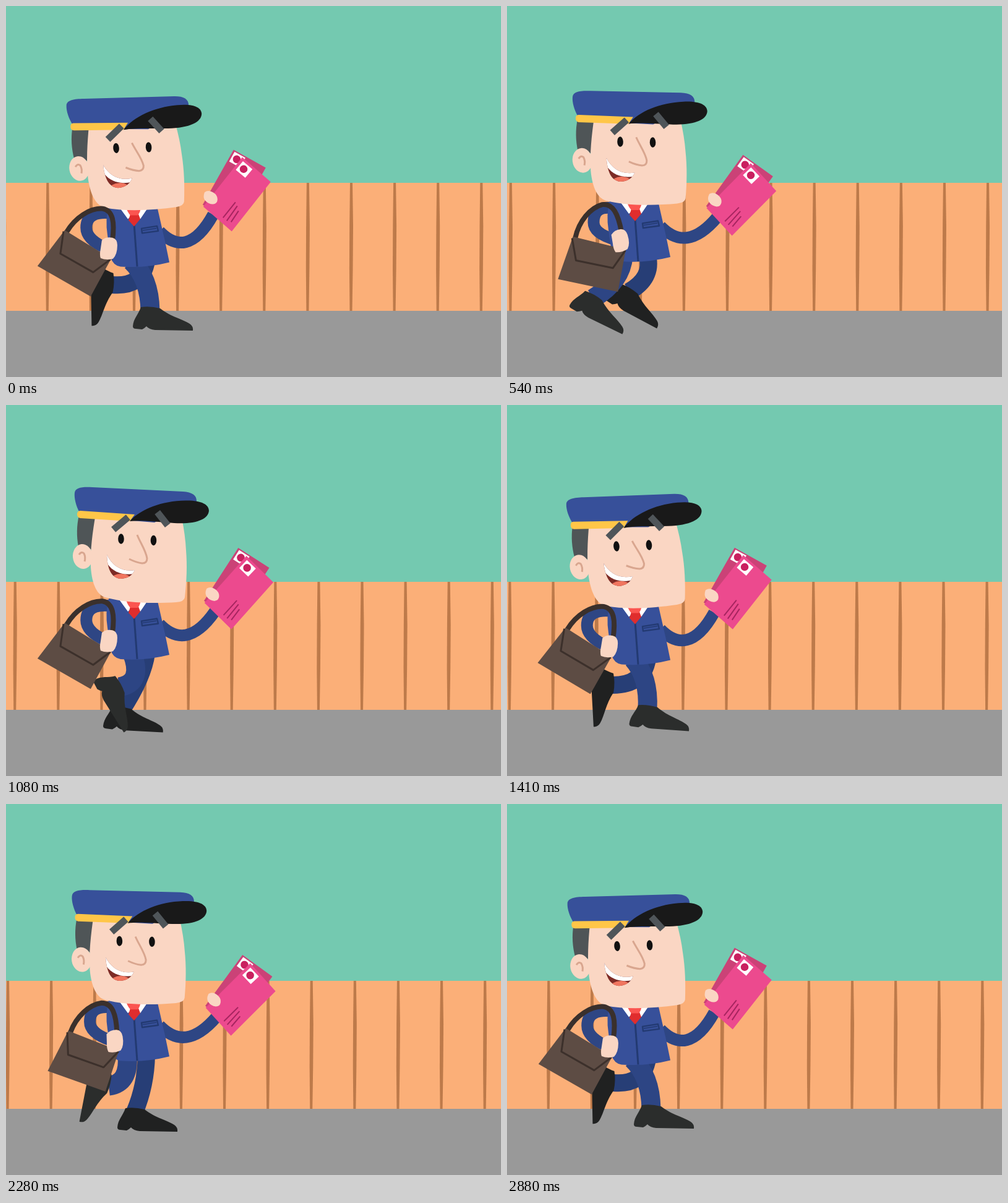
An HTML page with a canvas for the animation above (2910 ms loop, 800 by 600 pixels).

```html
<!DOCTYPE html>
<html lang="en">
<head>
<meta charset="utf-8">
<title>Postman on his round</title>
<style>
html, body { margin: 0; width: 100%; height: 100%; overflow: hidden; background: #74c9b0; }
canvas { display: block; }
</style>
</head>
<body>
<canvas id="stage" width="800" height="600"></canvas>
<script>
const g = document.getElementById('stage').getContext('2d');
const LOOP = 2910, STEP = 30, WALK = 1440;
const TAU = Math.PI * 2, DEG = Math.PI / 180;
const SKIN = '#fad6c3', BLUE = '#37509a', NAVY = '#233a72', ARM = '#2e4684';

// Rows: time, ankle x, ankle y, foot angle, knee x, knee y
const NEAR = [
  [0, 233, 489, 0, 232, 440],
  [120, 205, 492, 0, 216, 448],
  [330, 155, 489, 4, 182, 448],
  [540, 139, 469, 25, 185, 445],
  [700, 158, 448, 80, 196, 452],
  [840, 166, 452, 100, 200, 452],
  [1080, 183, 452, 57, 222, 450],
  [1260, 200, 460, 28, 232, 440],
  [1410, 227, 488, 3, 230, 440]
];
const FAR = [
  [0, 172, 447, 88, 220, 455],
  [330, 178, 438, 65, 224, 440],
  [540, 197, 458, 27, 236, 440],
  [690, 230, 488, 4, 238, 440],
  [720, 236, 490, 0, 238, 442],
  [840, 208, 494, 0, 226, 455],
  [1080, 186, 491, 2, 222, 440],
  [1260, 160, 472, 25, 215, 445],
  [1410, 171, 449, 86, 220, 453]
];
const BOB = [[0, 10.4], [60, 7.3], [120, 4.2], [240, 1], [345, 0], [450, 0.5], [540, 2], [620, 5], [690, 8.6]];
const TILT = [[0, -4.3], [120, -1.4], [230, -0.3], [345, 0], [440, -0.4], [540, -1.6], [620, -3.3], [690, -4.9]];

// Smooth periodic curve through the rows
function track(rows, period, time) {
  const t = time % period, n = rows.length;
  const at = i => {
    const turn = Math.floor(i / n), r = rows[i - turn * n];
    return { t: r[0] + turn * period, r };
  };
  let i = n - 1;
  while (rows[i][0] > t) i--;
  const a = at(i - 1), b = at(i), c = at(i + 1), d = at(i + 2);
  const h = c.t - b.t, u = (t - b.t) / h;
  return b.r.slice(1).map((v, k) => {
    const j = k + 1, w = c.r[j];
    const m0 = (w - a.r[j]) / (c.t - a.t) * h;
    const m1 = (d.r[j] - v) / (d.t - b.t) * h;
    const u2 = u * u, u3 = u2 * u;
    return (2 * u3 - 3 * u2 + 1) * v + (u3 - 2 * u2 + u) * m0 + (3 * u2 - 2 * u3) * w + (u3 - u2) * m1;
  });
}

const swing = (t, peak) => Math.cos((t - peak) / WALK * TAU);

function fill(d, color) {
  g.fillStyle = color;
  g.fill(new Path2D(d));
}
function line(d, color, width, cap = 'butt') {
  g.strokeStyle = color;
  g.lineWidth = width;
  g.lineCap = cap;
  g.lineJoin = 'round';
  g.stroke(new Path2D(d));
}
function oval(x, y, rx, ry, color, turn = 0) {
  g.fillStyle = color;
  g.beginPath();
  g.ellipse(x, y, rx, ry, turn * DEG, 0, TAU);
  g.fill();
}
function bar(x, y, w, h, turn, color) {
  place(x, y, turn, () => {
    g.fillStyle = color;
    g.fillRect(-w / 2, -h / 2, w, h);
  });
}
function place(x, y, turn, draw) {
  g.save();
  g.translate(x, y);
  g.rotate(turn * DEG);
  draw();
  g.restore();
}

function scene(t) {
  g.fillStyle = '#74c9b0';
  g.fillRect(0, 0, 800, 600);
  g.fillStyle = '#fbaf78';
  g.fillRect(0, 286, 800, 207);
  const gap = 70.1, shift = (t / 288 * gap) % gap;
  for (let x = 67.3 - shift - gap; x < 810; x += gap) {
    fill(`M${x - 2} 286h4l1 70l-.5 70l-1 67h-4l-.6 -67l.3 -70z`, '#bd7a4a');
  }
  g.fillStyle = '#999';
  g.fillRect(0, 493, 800, 107);
}

function leg(rows, t, hipX, hipY, width, cloth, leather) {
  const [x, y, turn, kx, ky] = track(rows, WALK, t);
  line(`M${hipX} ${hipY}Q${kx} ${ky} ${x} ${y + 4}`, cloth, width);
  place(x, y, turn, () => fill(
    'M-15 -2C-19 10 -27 16 -28 29Q-28 33 -23 33L-13 34Q-9 32 -6 29Q-2 34 8 35L69 36' +
    'Q70 29 64 25C52 17 34 14 16 0Q0 -4 -15 -2Z', leather));
}

function jacket() {
  fill('M166 313Q160 335 164 360L169 396Q173 409 185 411Q225 414 264 404L257 370L244 313Z', BLUE);
  line('M207 342Q209 370 212 411', NAVY, 3);
  line('M219 349.5L244 345.5L246 353.5L220 357Z', NAVY, 2.4);
  line('M221 352.5L243 349', NAVY, 1.5);
  fill('M181 312H232L217 334L207 325L197 334Z', '#fff');
  fill('M201 326H214L217 334L207 346L198 336Z', '#e02d2d');
  fill('M193 312H218Q218 322 213 328H201Q196 323 193 312Z', '#fb5550');
}

function head() {
  fill('M118 178C114 196 114 212 117 229L145 235L150 178Z', '#4f5557');
  fill('M145 176C140 205 136 235 137 262C139 292 148 307 160 311' +
    'C195 321 240 321 275 319Q288 318 289 311C292 285 293 260 291 235Q290 212 284 182Z', SKIN);
  oval(124, 245, 16, 20, SKIN, -6);
  line('M118 242Q122 236 126 240Q129 246 127 253', '#d9a68f', 3);
  oval(186, 216.5, 4.8, 8.2, '#111');
  oval(238.5, 219, 4.8, 8.2, '#111');
  line('M212 210C217 223 226 235 228 248Q228 256 220 256Q211 255 199 249', '#d9a68f', 3);

  g.save();
  g.clip(new Path2D('M163 242C172 261 188 270 208 267C204 276 196 281 184 281C168 278 164 262 163 242Z'));
  fill('M150 235H220V290H150Z', '#7d2b26');
  oval(186, 281, 15, 8, '#f0755f');
  fill('M160 235L164 257C173 270 188 276 208 273L215 255Z', '#fff');
  g.restore();

  fill('M119 174C113 163 110 150 111 142C112 133 124 132 140 133L286 140' +
    'C301 141 309 146 308 157L240 190L119 180Z', BLUE);
  fill('M120 171L208 177L200 188L120 183Q115 182 115 177Q115 171 120 171Z', '#ffc648');
  fill('M200 188C218 168 252 155 290 154.500C316 154 328 161 328 171C327 185 307 193 272 191C240 189 218 186 200 188Z', '#191919');
  bar(185.500, 191.500, 31, 11, -40, '#4f5559');
  bar(253, 184, 27, 11, 52, '#4f5559');
}

function stamp(x, y, turn) {
  place(x, y, turn, () => {
    g.fillStyle = '#fff';
    g.fillRect(-10, -9, 20, 18);
    oval(-1, 0, 6.3, 6.3, '#c9205f');
  });
}

function letters() {
  fill('M37 -77L89 -48L39 41L-13 12Z', '#cb4277');
  stamp(43, -61, 29);
  fill('M51 -65L97 -25L34 55L-12 15Z', '#ec4a8e');
  stamp(54, -45, 40);
  line('M40 8L20 33M43 14L26 38M45 22L33 40', '#a72560', 2);
  fill('M-10 -8Q-4 -13 4 -8Q11 -4 11 3Q11 10 4 11Q-4 11 -9 5Q-13 0 -10 -8Z', SKIN);
}

function bag() {
  line('M-68 -26C-54 -50 -30 -65 -10 -64C7 -61 10 -42 6 -12', '#3a302c', 8);
  fill('M-71 -29L4 17L-29 78L-115 29Z', '#5d4c44');
  line('M-73 -27L-78 9L-25 39L3 18', '#3c302b', 3);
  fill('M-11 -13Q-4 -19 6 -17Q14 -15 14 -5Q14 10 7 17Q-4 20 -13 16Q-15 10 -13 1Z', SKIN);
}

function postman(t) {
  const bob = track(BOB, WALK / 2, t)[0];
  const tilt = track(TILT, WALK / 2, t)[0];
  const hipY = 402 + bob;

  leg(FAR, t, 227, hipY, 28, '#273e76', '#202121');
  leg(NEAR, t, 197 + 9 * swing(t, 1230), hipY, 31, '#2d4584', '#2b2d2c');

  const s = swing(t, 540), u = swing(t, 710);
  const bagX = 173 + 10 * s, bagY = 379.5 - 2.5 * s;
  const mailX = 333.8 + 3 * u, mailY = 306 + 7 * u;
  const elbow = 134 + 6 * s;

  g.save();
  g.translate(0, bob);
  line(`M248 354C275 382 305 381 ${mailX + 4} ${mailY + 28}`, ARM, 19);
  line(`M172 325Q${elbow} 320 ${elbow} 348Q${elbow} 367 ${bagX - 4} ${bagY}`, ARM, 19);
  jacket();
  place(221, 324, tilt, () => {
    g.translate(-221, -324);
    head();
  });
  place(mailX, mailY, 3.7 * (u + 1), letters);
  place(bagX, bagY, -10.47 * (s + 0.7), bag);
  g.restore();
}

function frame(now) {
  const t = Math.floor((now - start) % LOOP / STEP) * STEP;
  scene(t);
  postman(t);
  requestAnimationFrame(frame);
}

const start = performance.now();
requestAnimationFrame(() => frame(performance.now()));
</script>
</body>
</html>
```
